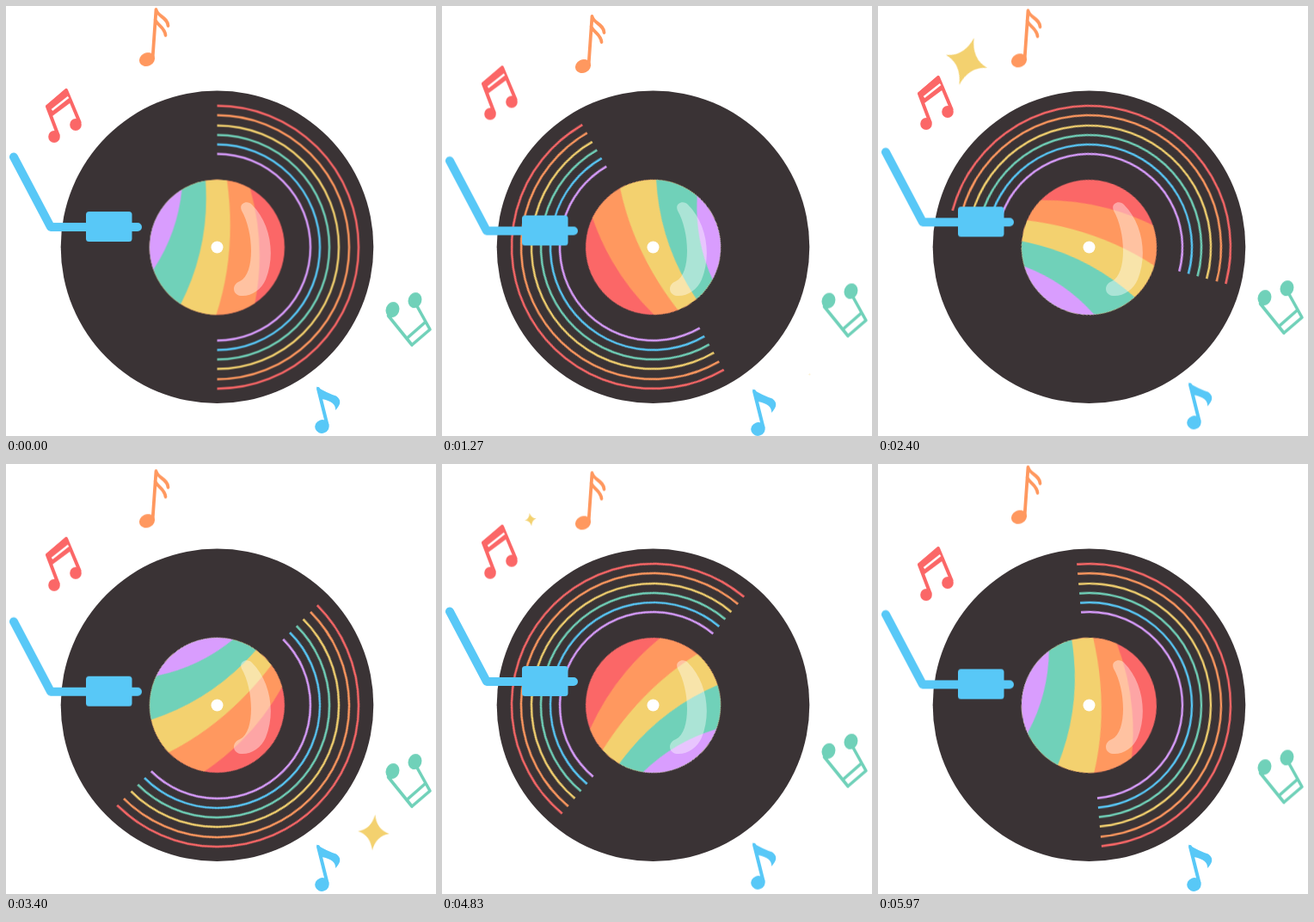
Write an HTML page without scripts that moves like this. It is 500 by 500 pixels and loops after 6.01 s.

```html
<!DOCTYPE html>
<html lang="en">
<head>
<meta charset="utf-8">
<title>Rainbow record</title>
<style>
  :root {
    --red: #fb6767;
    --orange: #ff985f;
    --yellow: #f3d16f;
    --green: #70d1b9;
    --blue: #58c8f7;
    --purple: #d99dfe;
  }
  html, body { margin: 0; width: 100%; height: 100%; overflow: hidden; background: #fff; }
  svg { display: block; width: 100%; height: 100%; }

  .red { --c: var(--red); }
  .orange { --c: var(--orange); }
  .yellow { --c: var(--yellow); }
  .green { --c: var(--green); }
  .blue { --c: var(--blue); }
  .purple { --c: var(--purple); }
  .fill { fill: var(--c); }
  .line { fill: none; stroke: var(--c); stroke-width: 4; stroke-linecap: round; stroke-linejoin: round; }
  .rings circle { fill: none; stroke: var(--c); stroke-width: 2.4; stroke-dasharray: 1; }

  /* Two turns at 24 poses a second, last pose held to the end of the loop */
  .spin { animation: spin 6010ms steps(143) -4ms infinite; }
  @keyframes spin {
    0% { transform: rotate(0deg); }
    99.1403%, 100% { transform: rotate(715deg); }
  }

  .bob { animation: bob 3005ms var(--d) infinite; }
  @keyframes bob {
    0%, 100% { transform: translateY(var(--a)); animation-timing-function: cubic-bezier(.39, .575, .565, 1); }
    50% { transform: translateY(var(--b)); animation-timing-function: cubic-bezier(.47, 0, .745, .715); }
  }
  .sway { animation: sway 3005ms cubic-bezier(.37, 0, .63, 1) -2597ms infinite; }
  @keyframes sway {
    0%, 100% { transform: translateY(4.1px); }
    50% { transform: translateY(-19.5px); }
  }
  .dip { animation: dip 3005ms cubic-bezier(.37, 0, .63, 1) infinite; }
  @keyframes dip {
    0%, 14%, 100% { transform: translateY(0); }
    37% { transform: translateY(3.3px); }
    76% { transform: translateY(-5px); }
  }

  .early { animation: early 3005ms linear infinite; }
  @keyframes early {
    0% { transform: rotate(-14deg) scale(0); }
    20.5% { transform: rotate(15deg) scale(1.05); }
    43%, 100% { transform: rotate(47deg) scale(0); }
  }
  .late { animation: late 3005ms linear infinite; }
  @keyframes late {
    0%, 56% { transform: rotate(-16deg) scale(0); }
    77% { transform: rotate(13deg) scale(1.08); }
    97.8%, 100% { transform: rotate(45deg) scale(0); }
  }
</style>
</head>
<body>
<svg viewBox="0 0 500 500">
  <defs>
    <clipPath id="label"><circle r="78.5"/></clipPath>
    <path id="star" d="M0-31Q5-5 27 0Q5 5 0 31Q-5 5-27 0Q-5-5 0-31z"/>
  </defs>

  <circle cx="245.5" cy="280.3" r="181.8" fill="#3a3335"/>

  <g transform="translate(245.5 280.5)">
    <g class="spin">
      <g class="rings" transform="rotate(-90)">
        <circle class="red" r="164.5" pathLength="2"/>
        <circle class="orange" r="153.5" pathLength="2"/>
        <circle class="yellow" r="141.5" pathLength="2"/>
        <circle class="green" r="130.5" pathLength="2"/>
        <circle class="blue" r="119.5" pathLength="2"/>
        <circle class="purple" r="108.5" pathLength="2"/>
      </g>
      <g clip-path="url(#label)">
        <circle class="red fill" r="79"/>
        <path class="orange fill" d="M38.5-68Q57-2 44 65V90H-90V-90H38.5z"/>
        <path class="yellow fill" d="M11.5-78Q23 5-1 78.5V90H-90V-90H11.5z"/>
        <path class="green fill" d="M-13.5-77.5Q-8-1.5-42.5 66.5V90H-90V-90H-13.5z"/>
        <path class="purple fill" d="M-41-67Q-46-17-73.5 25V90H-90V-90H-41z"/>
      </g>
    </g>
    <circle r="7" fill="#fff"/>
  </g>

  <path fill="#fff" fill-opacity=".41" d="M274 238C270 229 281 225 286 231C307 252 314 288 302 318C297 330 285 338 273 337C262 335 263 323 272 320C290 311 288 262 274 238z"/>

  <g class="bob blue" style="--a:15.2px;--b:-5.8px;--d:-2234ms">
    <path class="line" style="stroke-width:10" d="M9 175.5L52 257H153"/>
    <rect class="fill" x="93" y="239" width="53.5" height="35" rx="3.5"/>
  </g>

  <g class="bob orange" style="--a:-2.3px;--b:8px;--d:-230ms">
    <ellipse class="fill" cx="164" cy="62" rx="9.3" ry="7.8" transform="rotate(-25 164 62)"/>
    <path class="line" style="stroke-width:3.8" d="M170.5 61L174.5 4C176 12 188 13 188.5 23M173.5 16C176 22 185 25 185.5 34"/>
  </g>

  <g class="bob red" style="--a:.5px;--b:-27px;--d:-20ms">
    <ellipse class="fill" cx="56" cy="152" rx="6.8" ry="7"/>
    <ellipse class="fill" cx="81" cy="138" rx="6.8" ry="7"/>
    <path class="line" d="M60.5 150L48 117L70 98L85.5 135"/>
    <path class="fill" d="M46 116L70 96L77 111L54 128z"/>
    <path d="M53.5 121L72.5 106" stroke="#fff" stroke-width="2.6"/>
  </g>

  <g class="sway green">
    <ellipse class="fill" cx="449.5" cy="353" rx="7.8" ry="9.2" transform="rotate(20 449.5 353)"/>
    <ellipse class="fill" cx="475.5" cy="342" rx="7.8" ry="9.2" transform="rotate(20 475.5 342)"/>
    <path class="line" style="stroke-width:3.6" d="M444.5 360L472 394L493 376L478 349M466.5 386L487 368"/>
  </g>

  <g class="dip blue">
    <ellipse class="fill" cx="367.5" cy="489" rx="8.3" ry="7.8" transform="rotate(-20 367.5 489)"/>
    <path class="line" d="M373.5 487L363 445"/>
    <path class="fill" d="M361 442.5Q373 450 384 453.500Q393 460 383 470Q384 460 367 457z"/>
  </g>

  <g transform="translate(427.500 428.500)"><use href="#star" class="early yellow fill"/></g>
  <g transform="translate(103 64.500)"><use href="#star" class="late yellow fill"/></g>
</svg>
</body>
</html>
```
